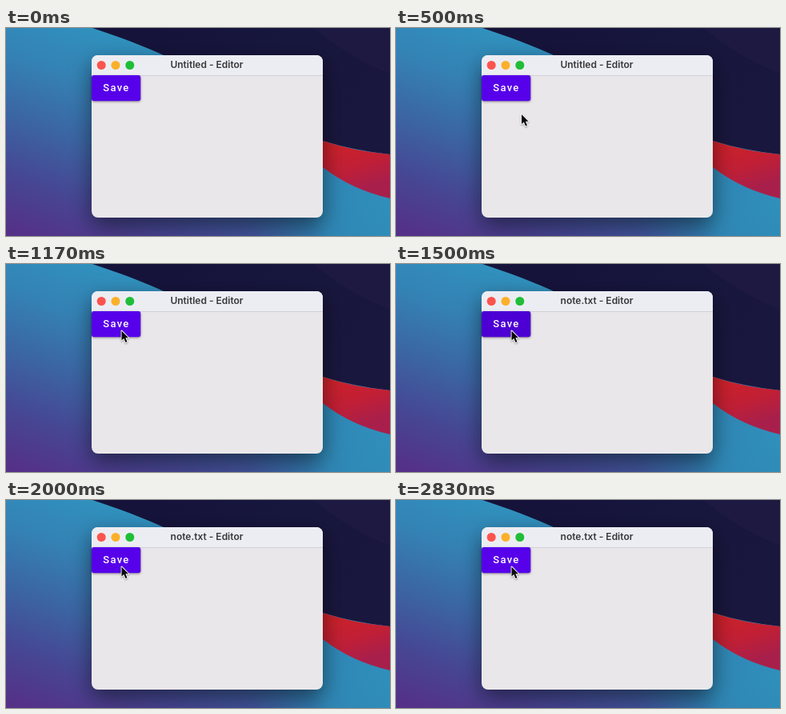
Write an HTML page with a canvas that moves like this. It is 480x260 px and loops after 2910 ms.

```html
<!DOCTYPE html>
<html lang="en">
<head>
<meta charset="utf-8">
<title>Editor window</title>
<style>
  html, body { margin: 0; width: 100%; height: 100%; overflow: hidden; background: #17163c; }
  canvas { display: block; width: 480px; height: 260px; }
</style>
</head>
<body>
<canvas id="stage" width="480" height="260"></canvas>
<script>
const W = 480, H = 260, LOOP = 2910, STEP = 1000 / 12;
const PRESS = 1320, RENAME = 1410;
const ctx = document.getElementById('stage').getContext('2d');

// Cursor tip over time: [ms, x, y]
const cursorPath = [
  [160, 232, 270], [250, 204, 201], [333, 180, 152], [417, 165, 122],
  [500, 157, 108], [667, 147, 91], [833, 143, 86], [1000, 144, 84], [1167, 144.5, 83.5]
];

function withStops(gradient, colors) {
  colors.forEach((c, i) => gradient.addColorStop(i / (colors.length - 1), c));
  return gradient;
}

const linear = (x0, y0, x1, y1, ...colors) =>
  withStops(ctx.createLinearGradient(x0, y0, x1, y1), colors);

const radial = (x, y, r, ...colors) =>
  withStops(ctx.createRadialGradient(x, y, 0, x, y, r), colors);

function fillPath(path, color) {
  ctx.fillStyle = color;
  ctx.fill(new Path2D(path));
}

function fillBox(x, y, w, h, radius, color) {
  ctx.beginPath();
  ctx.roundRect(x, y, w, h, radius);
  ctx.fillStyle = color;
  ctx.fill();
}

function withShadow(color, blur, offset, draw) {
  ctx.save();
  ctx.shadowColor = color;
  ctx.shadowBlur = blur;
  ctx.shadowOffsetY = offset;
  draw();
  ctx.restore();
}

function label(text, x, y, font, color, align, spacing) {
  ctx.font = font;
  ctx.fillStyle = color;
  ctx.textAlign = align;
  ctx.letterSpacing = spacing;
  ctx.fillText(text, x, y);
}

function drawWallpaper() {
  const stage = `M0 0H${W}V${H}H0Z`;
  fillPath(stage, linear(125, 0, 30, 265, '#3092be', '#3482b5', '#3b66a4', '#464794', '#553087'));
  fillPath(stage, radial(490, 215, 190, '#3090bc', '#2f86b4', 'rgba(47,110,165,0)'));

  // Dark sweep, with a slightly lighter fold in the corner
  fillPath('M108 0C175 22 235 48 290 85C330 112 365 134 396 141Q435 153 480 158V0Z',
    linear(200, 0, 440, 150, '#15133a', '#17163d', '#19173d'));
  fillPath('M384 0Q430 38 480 57V0Z', '#1d1941');

  fillPath('M340 112Q370 134 396 141Q435 154 480 158V213Q432 202 396 174Q365 150 340 112Z',
    linear(420, 145, 440, 203, '#cb212b', '#c11f35', '#a91f4b'));
}

function drawWindow(title) {
  withShadow('rgba(0,0,0,.5)', 28, 10, () => fillBox(107, 34, 289, 203, 8, '#e9e7e9'));
  fillBox(107, 34, 289, 25, [8, 8, 0, 0], '#ecedf3');
  ctx.fillStyle = '#d1d0d5';
  ctx.fillRect(107, 59, 289, 1);

  ['#fc544d', '#fbb02a', '#20be38'].forEach((color, i) => {
    ctx.beginPath();
    ctx.arc(119.2 + i * 17.8, 46.5, 5.5, 0, Math.PI * 2);
    ctx.fillStyle = color;
    ctx.fill();
  });
  label(title, 251, 50.3, '600 12px Inter, sans-serif', '#38373b', 'center', '0px');
}

function pressAmount(t) {
  if (t < PRESS) return 0;
  if (t < 1510) return Math.min(1, (t - PRESS + STEP) / 160);
  return Math.max(0, 1 - (t - 1500) / 250);
}

function drawButton(press) {
  withShadow('rgba(0,0,0,.4)', 3, 1, () => fillBox(107, 59, 61.3, 32.3, 3, '#5700ea'));
  if (press) fillBox(107, 59, 61.3, 32.3, 3, `rgba(0,0,60,${0.13 * press})`);
  label('Save', 121.3, 79.3, '500 13px Roboto, sans-serif', '#fff', 'left', '1.3px');
}

function cursorAt(t) {
  if (t < cursorPath[0][0]) return null;
  const next = cursorPath.findIndex(key => key[0] > t);
  if (next < 0) return cursorPath[cursorPath.length - 1].slice(1);
  const [t0, x0, y0] = cursorPath[next - 1], [t1, x1, y1] = cursorPath[next];
  const k = (t - t0) / (t1 - t0);
  return [x0 + (x1 - x0) * k, y0 + (y1 - y0) * k];
}

function drawCursor([x, y]) {
  const arrow = new Path2D('M0 0V12L2.8 9.5L5 14.6L7 13.7L4.9 8.8H8.6Z');
  ctx.save();
  ctx.translate(x, y);
  ctx.lineJoin = 'round';
  ctx.lineWidth = 1.8;
  ctx.strokeStyle = '#fff';
  withShadow('rgba(0,0,0,.35)', 2, 1, () => ctx.stroke(arrow));
  ctx.fillStyle = '#08080a';
  ctx.fill(arrow);
  ctx.restore();
}

function draw(now) {
  const t = Math.floor((now % LOOP + 5) / STEP) * STEP;
  drawWallpaper();
  drawWindow(t < RENAME ? 'Untitled - Editor' : 'note.txt - Editor');
  drawButton(pressAmount(t));
  const tip = cursorAt(t);
  if (tip) drawCursor(tip);
}

const start = performance.now();
function tick() {
  draw(performance.now() - start);
  requestAnimationFrame(tick);
}
tick();
</script>
</body>
</html>
```
